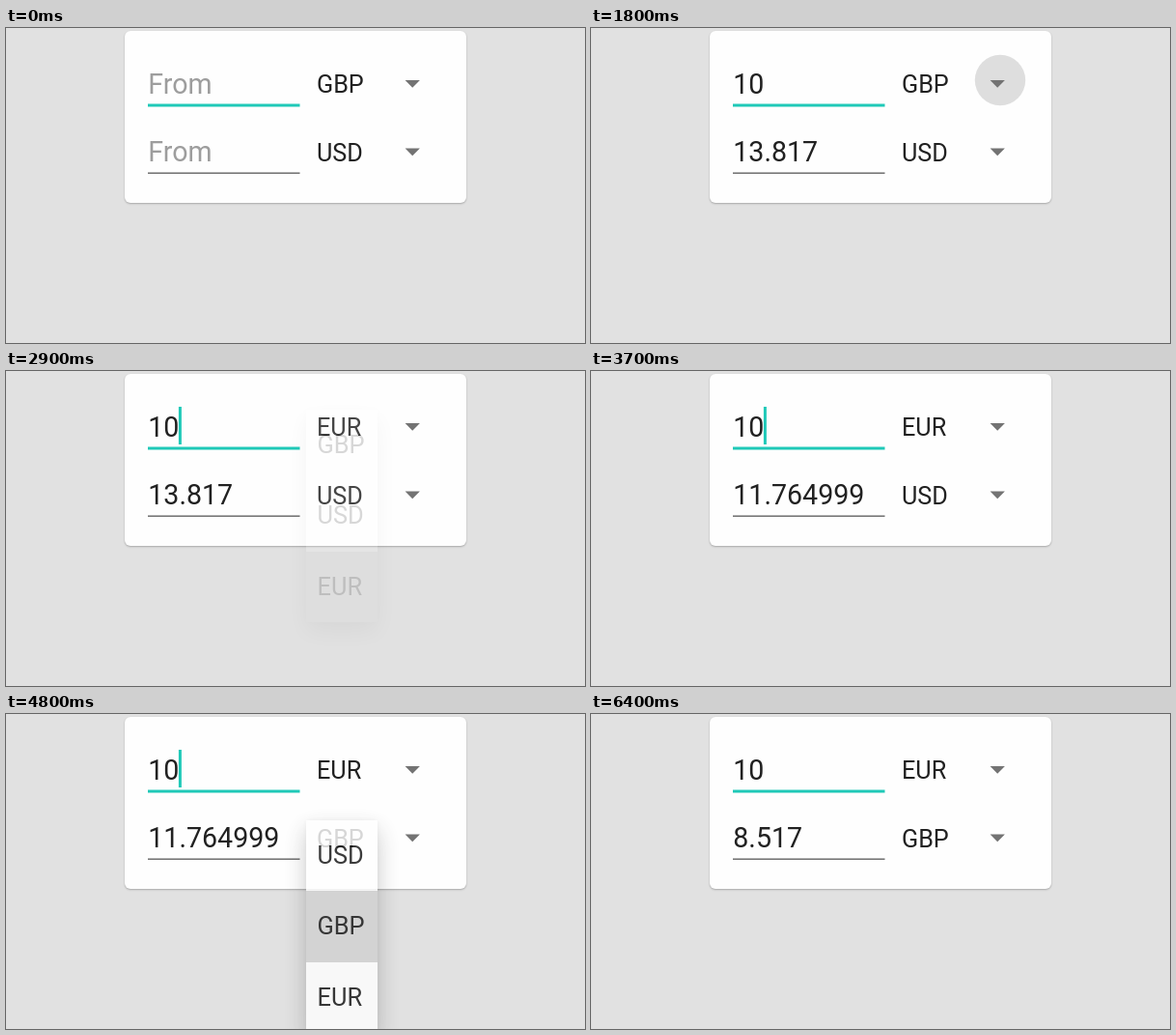
An HTML page that plays this animation: 600 by 326 pixels, repeating every 6600 ms.

```html
<!DOCTYPE html>
<html lang="en">
<head>
<meta charset="utf-8">
<title>Currency converter</title>
<style>
  html, body { margin: 0; width: 100%; height: 100%; overflow: hidden; background: #e1e1e1; }
  body { position: relative; font-family: Roboto, Arial, sans-serif; }
  .card {
    position: absolute; left: 122.5px; top: 3px; width: 354px; height: 178px;
    border-radius: 6px; background: #fefefe; box-shadow: 0 1px 2px rgba(0, 0, 0, .26);
  }
  svg { position: absolute; left: 0; top: 0; }
  .field { font-size: 28.6px; fill: #212121; }
  .hint { fill: #9d9d9d; }
  .unit { font-size: 25.2px; fill: #212121; }
  .arrow { fill: #737373; }
  .popup {
    position: absolute; width: 74px; overflow: hidden; background: #fefefe;
    box-shadow: 0 10px 24px rgba(0, 0, 0, .25), 0 0 6px rgba(0, 0, 0, .06);
  }
  .list { position: absolute; left: 0; width: 100%; }
  .item {
    height: 73.4px; line-height: 73.4px; padding-left: 11.5px;
    font-size: 25.4px; color: #111; white-space: nowrap;
  }
</style>
</head>
<body>
<div class="card"></div>
<svg width="600" height="326" viewBox="0 0 600 326">
  <circle id="ripple1"/>
  <circle id="ripple2"/>
  <text id="amount" class="field" x="147.3" y="67.5"></text>
  <text id="result" class="field" x="147.3" y="138"></text>
  <rect x="147" y="78.5" width="157.5" height="3" fill="#1fc9b8"/>
  <rect x="147" y="149.4" width="157.5" height="1.6" fill="#777"/>
  <rect id="cursor" y="37" width="3" height="39" fill="#1fc9b8"/>
  <text id="unit1" class="unit" x="322" y="67.3"></text>
  <text id="unit2" class="unit" x="322" y="137.8"></text>
  <path class="arrow" d="M413.6 54H428.9L421.2 61.8Z"/>
  <path class="arrow" d="M413.6 124.5H428.9L421.2 132.3Z"/>
</svg>
<script>
const LOOP = 6600, STEP = 100, ROW = 73.4, LEFT = 311;
const $ = id => document.getElementById(id);
const clamp = v => Math.min(1, Math.max(0, v));

// [start time, value] steps
const tracks = {
  amount: [[0, ''], [500, '1'], [600, '10']],
  result: [[0, ''], [500, '1.3817'], [600, '13.817'], [3100, '11.764999'], [5200, '8.517']],
  unit1: [[0, 'GBP'], [2700, 'EUR']],
  unit2: [[0, 'USD'], [4700, 'GBP']]
};
const cursorToggles = [100, 1000, 1400, 1800, 2800, 3200, 3600, 5600, 6000, 6400];
const cursorX = [148.3, 163.3, 178.9];

const ripples = [
  { el: $('ripple1'), y: 57, start: 1650, release: 1900 },
  { el: $('ripple2'), y: 128, start: 3750, release: 4050 }
];
const popups = [
  { items: ['GBP', 'USD', 'EUR'], pick: 2, top: 39.8, open: 1900, press: 2450, close: 2640 },
  { items: ['USD', 'GBP', 'EUR'], pick: 1, top: 110, open: 3950, press: 4500, close: 4700 }
];

for (const p of popups) {
  p.box = document.createElement('div');
  p.box.className = 'popup';
  p.list = document.createElement('div');
  p.list.className = 'list';
  p.rows = p.items.map(name => {
    const row = document.createElement('div');
    row.className = 'item';
    row.textContent = name;
    p.list.append(row);
    return row;
  });
  p.box.append(p.list);
  document.body.append(p.box);
}

const valueAt = (track, t) => track.filter(s => s[0] <= t).pop()[1];

function drawFields(t) {
  for (const id in tracks) {
    const value = valueAt(tracks[id], t);
    const empty = value === '';
    $(id).textContent = empty ? 'From' : value;
    $(id).classList.toggle('hint', empty);
  }
  const on = cursorToggles.filter(s => s <= t).length % 2;
  $('cursor').setAttribute('x', cursorX[valueAt(tracks.amount, t).length]);
  $('cursor').setAttribute('opacity', on);
}

// The ripple grows from the touch point towards the arrow, then fades.
function drawRipple({ el, y, start, release }, t) {
  const p = clamp((t - start) / 200);
  const alpha = t < start ? 0 : .125 * (1 - clamp((t - release) / 260));
  el.setAttribute('cx', 421 + 12 * (1 - p));
  el.setAttribute('cy', y - 12 * (1 - p));
  el.setAttribute('r', 14 + 16.3 * p);
  el.setAttribute('fill-opacity', alpha);
}

// The list slides into place while its clip grows downwards.
function drawPopup(p, t) {
  const shift = 30 * (1 - clamp((t - p.open) / 300)) ** 2;
  const alpha = clamp((t - p.open) / 100) * (1 - clamp((t - p.close) / 290) ** 1.6);
  const press = clamp((t - p.press) / 150);
  p.box.style.opacity = alpha;
  p.box.style.left = LEFT + .36 * shift + 'px';
  p.box.style.top = p.top + 'px';
  p.box.style.height = ROW * 3 - 2 * shift + 'px';
  p.list.style.top = -shift + 'px';
  p.rows[p.pick].style.background = `rgba(0, 0, 0, ${.18 * press})`;
}

function draw(t) {
  drawFields(t);
  ripples.forEach(r => drawRipple(r, t));
  popups.forEach(p => drawPopup(p, t));
}

const begin = performance.now();
function tick() {
  const t = (performance.now() - begin) % LOOP;
  draw(Math.floor(t / STEP) * STEP);
  requestAnimationFrame(tick);
}
draw(0);
requestAnimationFrame(tick);
</script>
</body>
</html>
```
